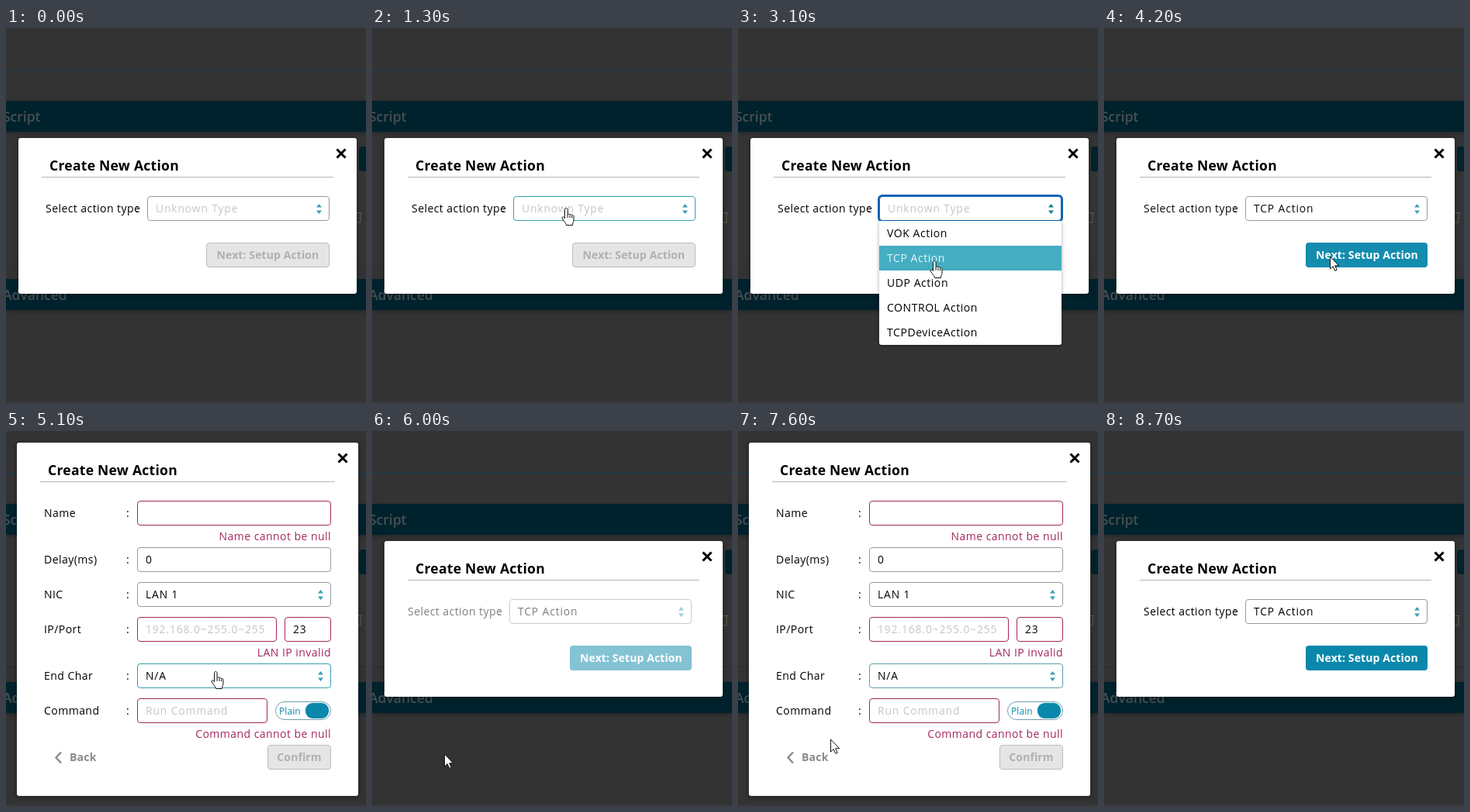
An HTML page that plays this animation: 464x484 px, repeating every 9.8 s.

```html
<!DOCTYPE html>
<html lang="en">
<head>
<meta charset="utf-8">
<title>Create New Action</title>
<style>
html, body { margin: 0; width: 100%; height: 100%; overflow: hidden; background: #333; }
#stage { position: relative; width: 464px; height: 484px; overflow: hidden; background: #333;
  font: 14px "Open Sans", "Noto Sans", sans-serif; letter-spacing: .45px; color: #000; }
#stage div, #stage svg { position: absolute; box-sizing: border-box; }
.text { line-height: 24px; margin-top: -12px; white-space: pre; }
.bar { left: 0; width: 464px; height: 40px; background: #00222c; box-shadow: 0 2px 5px #0004; }
.bar .text { font-size: 17.5px; font-weight: 600; letter-spacing: 0; color: #474f52; }
#modal { background: #fff; border-radius: 3px; box-shadow: 0 1px 6px #0006; }
#title { left: 40px; top: 34.5px; font-size: 17.5px; font-weight: 700; letter-spacing: .28px; }
#rule { left: 30px; right: 30px; top: 50px; height: 1px; background: #b7b7b7; }
#close { right: 13px; top: 13px; }
.page { left: 0; top: 0; width: 464px; height: 484px; }
.field { height: 32px; border: 1px solid #949b9f; border-radius: 4px; background: #fff; overflow: hidden; }
.field .text { left: 10px; top: 15px; font-size: 13.8px; letter-spacing: .9px; }
.field svg { right: 8px; top: 8px; color: #3a9fb3; }
#stage .hint { color: #c6c6c6; }
.bad { border-color: #a3275f; }
.error { right: 45px; color: #a3275f; }
.button { height: 32px; border-radius: 4px; line-height: 32px; text-align: center;
  font-size: 14px; font-weight: 700; letter-spacing: .1px; }
.off { background: #e5e5e5; border: 1px solid #bcbcbc; color: #b0b0b0; line-height: 30px; }
.on { background: #0a88ab; color: #fff; padding-left: 1px; }
#list { left: 182px; top: 249px; width: 235px; height: 160px; background: #fff;
  box-shadow: 0 1px 5px #0005; border-radius: 0 0 3px 3px; }
.item { left: 0; width: 235px; height: 32px; line-height: 32px; padding-left: 10px; letter-spacing: .55px; }
#back { left: 62px; top: 409px; width: 60px; height: 24px; color: #8a8a8a; }
#toggle { left: 347px; top: 349px; width: 72px; height: 24px; border: 1px solid #6e9fae;
  border-radius: 12px; color: #0a88ab; font-size: 12px; letter-spacing: .1px; }
#toggle i { position: absolute; right: 2px; top: 1px; width: 30px; height: 20px; border-radius: 9px; background: #0a88ab; }
</style>
</head>
<body>
<div id="stage"></div>
<script>
const LOOP = 9800, STEP = 100;
const $ = id => document.getElementById(id);

const text = (x, y, str, cls = '') =>
  `<div class="text ${cls}" style="${x === null ? '' : `left:${x}px;`}top:${y}px">${str}</div>`;
const sorter = '<svg width="9" height="15"><path d="M1 5.5 4.5 1 8 5.5zM1 9.5h7L4.5 14z" fill="currentColor"/></svg>';
const field = (x, y, w, str, { cls = '', hint = '', id = '', select = false } = {}) =>
  `<div class="field ${cls}" ${id && `id="${id}"`} style="left:${x}px;top:${y}px;width:${w}px">
    <div class="text ${hint}">${str}</div>${select ? sorter : ''}</div>`;
const label = (y, str) => text(49, y, str) + text(155, y, ':');
const error = (y, str) => text(null, y, str, 'error');
const bar = (y, x, str) => `<div class="bar" style="top:${y}px">${text(x, 20, str)}</div>`;
const block = (x, y, w, h, color) =>
  `<div style="left:${x}px;top:${y}px;width:${w}px;height:${h}px;background:${color}"></div>`;

const items = ['VOK Action', 'TCP Action', 'UDP Action', 'CONTROL Action', 'TCPDeviceAction'];

$('stage').innerHTML = `
  ${block(0, 54, 464, 1, '#14425a')}
  ${block(0, 134, 464, 170, '#343434')}${block(0, 304, 464, 1, '#2a2a2a')}
  ${bar(94, -4, 'Script')}${bar(324, -4, 'Advanced')}
  <div style="left:455px;top:153px;width:20px;height:32px;border-radius:4px;background:#00222c"></div>
  <svg style="left:449px;top:235px" width="12" height="18"><path d="M0 3.5h10M2 4v12h6V4" fill="none" stroke="#5f5f58"/></svg>
  ${block(0, 482, 464, 1, '#3c383a')}
  <div id="modal">
    <div class="text" id="title">Create New Action</div><div id="rule"></div>
    <svg id="close" width="14" height="14"><path d="M1.5 1.5l11 11M12.5 1.5l-11 11" stroke="#000" stroke-width="3"/></svg>
  </div>
  <div class="page" id="pick">
    ${text(51, 233, 'Select action type')}${text(167, 233, ':')}
    ${field(182, 217, 235, 'Unknown Type', { id: 'type', select: true })}
    <div class="button" id="next">Next: Setup Action</div>
    <div id="list">${items.map((s, i) => `<div class="item" style="top:${i * 32}px">${s}</div>`).join('')}</div>
  </div>
  <div class="page" id="form">
    ${label(106, 'Name')}${field(169, 90, 250, '', { cls: 'bad' })}${error(136, 'Name cannot be null')}
    ${label(166, 'Delay(ms)')}${field(169, 150, 250, '0')}
    ${label(211, 'NIC')}${field(169, 195, 250, 'LAN 1', { select: true })}
    ${label(256, 'IP/Port')}
    <div class="field bad" style="left:169px;top:240px;width:180px">
      <div style="left:10px;top:0;width:158px;height:30px;overflow:hidden">
        <div class="text hint" style="left:0">192.168.0~255.0~255</div></div></div>
    ${field(359, 240, 60, '23', { cls: 'bad' })}${error(286, 'LAN IP invalid')}
    ${label(316, 'End Char')}${field(169, 300, 250, 'N/A', { id: 'end', select: true })}
    ${label(361, 'Command')}${field(169, 345, 168, 'Run Command', { cls: 'bad', hint: 'hint' })}
    <div id="toggle">${text(4, 11.5, 'Plain')}<i></i></div>
    ${error(391, 'Command cannot be null')}
    <div id="back"><svg width="12" height="24"><path d="M9 5.5 2.5 12.5 9 19.5" fill="none" stroke="currentColor" stroke-width="2.4"/></svg>
      <div class="text" style="left:20px;top:12px;font-weight:700;letter-spacing:.2px">Back</div></div>
    <div class="button off" style="left:337px;top:405px;width:82px">Confirm</div>
  </div>
  <svg id="arrow" width="16" height="22"><path d="M.5.5v16l3.7-3.4 2.5 5.8 2.5-1.1-2.5-5.6h5z" fill="#fff" stroke="#111"/></svg>
  <svg id="hand" width="20" height="26"><path d="M5.5 2.6c0-2.8 3.6-2.8 3.6 0v6c.6-1 2.6-.8 2.9.4.8-.9 2.5-.5 2.7.7 1-.6 2.3 0 2.3 1.4v5c0 2-1.4 3-1.6 6.4H7.6c-.5-3-3.4-5-5.3-8.5-1.1-2 1.1-3 2.2-1.6l1 1.2zM9.1 8.6v4.2M12 9.4v3.6M14.7 10.2v3" fill="#fff" stroke="#111" stroke-linejoin="round"/></svg>`;

const path = [ // time, x, y
  [700, 292, 121], [1300, 250, 232], [1900, 250, 232], [2100, 251, 262], [2300, 252, 300],
  [2400, 253, 314], [2500, 253, 322], [2700, 253, 322], [2900, 253, 300], [3300, 253, 300],
  [3700, 292, 295], [4900, 292, 295], [5100, 270, 310], [5500, 120, 398], [5700, 94, 417],
  [6100, 94, 417], [6400, 170, 365], [6800, 292, 295], [7300, 292, 295], [7500, 200, 328],
  [7600, 120, 398], [7700, 98, 414], [7800, 94, 417], [8400, 97, 417], [8500, 200, 360], [8600, 388, 292]
];
const swaps = [[4300, true], [6000, false], [7100, true], [8100, false]]; // time, form shown
const SELECT = 3200;
const typeBox = [182, 217, 235, 32], nextBox = [260, 277, 157, 32];
const endBox = [169, 300, 250, 32], backBox = [62, 409, 60, 24];
const itemBox = i => [182, 249 + i * 32, 235, 32];

function at(t) {
  if (t < 700 || t >= 8700) return [-50, -50];
  const i = path.findIndex(p => p[0] >= t);
  if (i <= 0) return path[i < 0 ? path.length - 1 : 0].slice(1);
  const [t0, x0, y0] = path[i - 1], [t1, x1, y1] = path[i], k = (t - t0) / (t1 - t0);
  return [x0 + (x1 - x0) * k, y0 + (y1 - y0) * k];
}
const inside = (t, [x, y, w, h]) => {
  const [px, py] = at(t);
  return px >= x && px < x + w && py >= y && py < y + h;
};
const hover = (t, box, decay) => inside(t, box) ? 1 : inside(t - STEP, box) ? decay : 0;
const mix = (a, b, k) => `rgb(${a.map((v, i) => Math.round(v + (b[i] - v) * k))})`;
const edge = k => mix([148, 155, 159], [58, 159, 179], k);
const fade = (t, from, to) => Math.min(1, Math.max(0, (t - from) / (to - from)));

function draw(t) {
  let form = false, alpha = 1, shift = 0, busy = false;
  for (const [time, value] of swaps) {
    const d = t - time;
    if (d >= 0) form = value;
    if (d === -STEP) { alpha = .96; busy = true; }
    if (d === 0) { alpha = .5; shift = value ? 5 : -5; busy = true; }
    if (d === STEP) { alpha = .9; shift = value ? 1 : -1; }
  }
  const chosen = t >= SELECT;
  const open = Math.min(fade(t, 1500, 1800), 1 - fade(t, 3200, 3500));

  const [x, y, w, h] = form ? [14, 15, 440, 456] : [16, 142, 436, 201];
  Object.assign($('modal').style, { left: x + 'px', top: y + 'px', width: w + 'px', height: h + 'px' });
  for (const id of ['pick', 'form']) {
    const s = $(id).style;
    s.display = (id === 'form') === form ? 'block' : 'none';
    s.opacity = alpha;
    s.transform = `translateX(${shift}px)`;
  }

  const type = $('type');
  type.firstElementChild.textContent = chosen ? 'TCP Action' : 'Unknown Type';
  type.firstElementChild.className = chosen ? 'text' : 'text hint';
  type.lastElementChild.style.color = open ? '#0e7f96' : '#3a9fb3';
  type.style.borderColor = open ? '#0d63b4' : edge(hover(t, typeBox, .4));
  type.style.boxShadow = open ? '0 0 0 2px #0d63b4' : 'none';

  $('next').className = 'button ' + (chosen ? 'on' : 'off');
  $('next').style.cssText = chosen ? 'left:260px;top:277px;width:157px' : 'left:258px;top:277px;width:159px';

  $('list').style.opacity = open;
  [...$('list').children].forEach((item, i) => {
    const k = hover(t, itemBox(i), .1);
    item.style.background = `rgba(69,174,194,${k})`;
    item.style.color = k === 1 ? '#e6f5f8' : '#000';
  });

  $('end').style.borderColor = edge(hover(t, endBox, .6));
  $('back').style.color = inside(t, backBox) ? '#0a88ab' : '#8a8a8a';

  const targets = form ? [endBox, backBox]
    : [typeBox, ...(chosen ? [nextBox] : []), ...(open ? items.map((_, i) => itemBox(i)) : [])];
  const hand = !busy && targets.some(b => inside(t, b));
  const [px, py] = at(t);
  $('hand').style.transform = `translate(${px - 7}px,${py}px)`;
  $('arrow').style.transform = `translate(${px - 1}px,${py - .5}px)`;
  for (const id of ['hand', 'arrow']) {
    $(id).style.left = $(id).style.top = 0;
    $(id).style.display = (id === 'hand') === hand ? 'block' : 'none';
  }
}

let last = -1;
function tick() {
  const t = Math.floor(performance.now() % LOOP / STEP) * STEP;
  if (t !== last) draw(last = t);
  requestAnimationFrame(tick);
}
tick();
</script>
</body>
</html>
```
